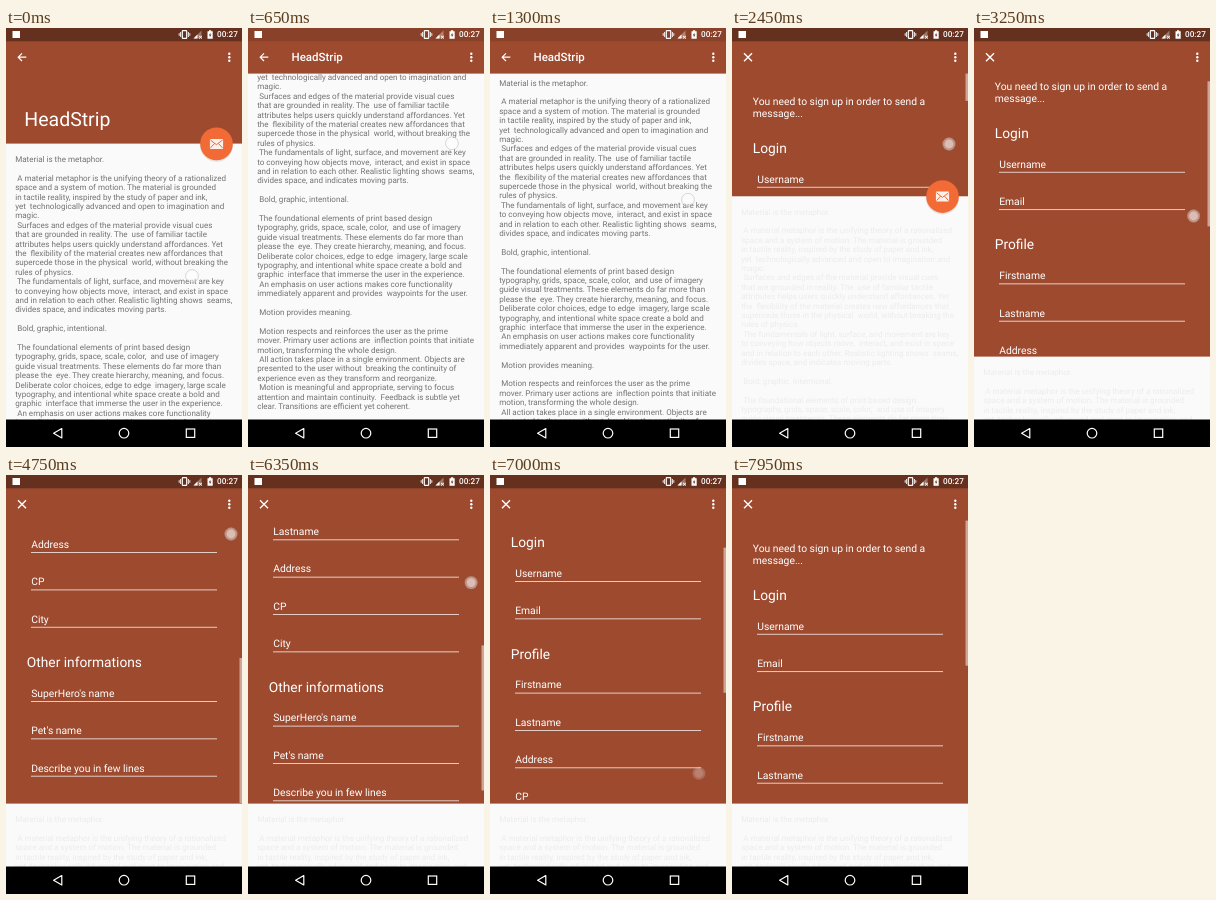
Write an HTML page that moves like this. It is 236 px wide and 419 px high and loops after 8000 ms.

```html
<!DOCTYPE html>
<html lang="en">
<head>
<meta charset="utf-8">
<title>Expanding app bar</title>
<style>
  html, body { margin: 0; width: 100%; height: 100%; overflow: hidden; background: #000; }
  svg { display: block; width: 236px; height: 419px; }
  text { font-family: Roboto, sans-serif; white-space: pre; fill: #fff; text-rendering: geometricPrecision; }
  #body text { font-size: 8.05px; fill: #737373; }
  .field, .intro { font-size: 10.33px; }
  .head { font-size: 13.78px; }
  .line { fill: none; stroke: #fff; }
</style>
</head>
<body>
<svg viewBox="0 0 236 419">
  <defs>
    <clipPath id="formClip"><rect id="formBox" x="0" y="45" width="236" height="284"/></clipPath>
  </defs>
  <rect width="236" height="419" fill="#fafafa"/>
  <g id="body"></g>

  <rect id="header" width="236" height="116" fill="#9d4a2f"/>
  <g id="form" clip-path="url(#formClip)">
    <g id="fields"></g>
    <rect id="thumb" x="233.5" width="2.5" fill="#fff" fill-opacity=".5"/>
  </g>
  <text id="title">HeadStrip</text>
  <path id="back" class="line" stroke-width="1.2" d="M20.3 29.2H12.5M16 25.4L12.2 29.2L16 33"/>
  <path id="close" class="line" stroke-width="1.4" d="M12 25.2L20 33.2M20 25.2L12 33.2"/>
  <g fill="#fff">
    <circle cx="223.3" cy="25.8" r="1.2"/>
    <circle cx="223.3" cy="29.3" r="1.2"/>
    <circle cx="223.3" cy="32.8" r="1.2"/>
  </g>

  <g id="fab">
    <circle cy="1.2" r="16.6" fill="#000" fill-opacity=".1"/>
    <circle r="16.3" fill="#f26a35"/>
    <rect x="-6.6" y="-5" width="13.2" height="10" rx="1" fill="#fdf0ea"/>
    <path d="M-6 -3.8L0 .8L6 -3.8M-6 4L-2 -.4M6 4L2 -.4" fill="none" stroke="#f26a35"/>
  </g>

  <rect id="status" width="236" height="13.3"/>
  <rect x="6.5" y="3" width="7.5" height="7" fill="#fff"/>
  <rect class="line" x="176.3" y="2.6" width="4.4" height="7.8" rx=".7" stroke-width="1.2"/>
  <path class="line" stroke-width=".9" d="M174.6 4V9M182.4 4V9M173.2 5.2V7.8M183.8 5.2V7.8"/>
  <path d="M195.5 2.5V10.5H187.5Z" fill="#fff" fill-opacity=".35"/>
  <path d="M191.5 6.5V10.5H187.5Z" fill="#fff"/>
  <path class="line" stroke-width="1" d="M193 7.8L196 10.6M196 7.8L193 10.6"/>
  <path d="M201.5 3.2H203V2.3H205.2V3.2H206.7V10.7H201.5Z" fill="#fff"/>
  <path d="M204.5 4.5L202.8 7.4H204L203.7 9.4L205.4 6.5H204.2Z" fill="#66301f"/>
  <text x="211" y="9.2" font-size="8.2" font-weight="500">00:27</text>

  <rect y="391.5" width="236" height="28" fill="#000"/>
  <path class="line" stroke-width="1.2" stroke-linejoin="round" d="M55.8 400.6V410L47.6 405.3Z"/>
  <circle class="line" cx="118" cy="405.2" r="4.8" stroke-width="1.2"/>
  <rect class="line" x="180.3" y="401" width="8.4" height="8.4" stroke-width="1.2"/>

  <g id="touch">
    <circle r="6.4" fill="#fff" fill-opacity=".4" stroke="#888" stroke-opacity=".3"/>
    <circle r="4.4" fill="#fff" fill-opacity=".4"/>
  </g>
</svg>

<script>
const LOOP = 8000, STEP = 50;
const BAR = 45.6, HEADER = 115.6, SHEET = 328.6, CONTENT = 552, PAGE_END = 129;
const $ = id => document.getElementById(id);

const copy = `Material is the metaphor.

 A material metaphor is the unifying theory of a rationalized
space and a system of motion. The material is grounded
in tactile reality, inspired by the study of paper and ink,
yet  technologically advanced and open to imagination and
magic.
 Surfaces and edges of the material provide visual cues
that are grounded in reality. The  use of familiar tactile
attributes helps users quickly understand affordances. Yet
the  flexibility of the material creates new affordances that
supercede those in the physical  world, without breaking the
rules of physics.
 The fundamentals of light, surface, and movement are key
to conveying how objects move,  interact, and exist in space
and in relation to each other. Realistic lighting shows  seams,
divides space, and indicates moving parts.

 Bold, graphic, intentional.

 The foundational elements of print based design
typography, grids, space, scale, color,  and use of imagery
guide visual treatments. These elements do far more than
please the  eye. They create hierarchy, meaning, and focus.
Deliberate color choices, edge to edge  imagery, large scale
typography, and intentional white space create a bold and
graphic  interface that immerse the user in the experience.
 An emphasis on user actions makes core functionality
immediately apparent and provides  waypoints for the user.

 Motion provides meaning.

 Motion respects and reinforces the user as the prime
mover. Primary user actions are  inflection points that initiate
motion, transforming the whole design.
 All action takes place in a single environment. Objects are
presented to the user without  breaking the continuity of
experience even as they transform and reorganize.
 Motion is meaningful and appropriate, serving to focus
attention and maintain continuity.  Feedback is subtle yet
clear. Transitions are efficient yet coherent.`;

const NS = 'http://www.w3.org/2000/svg';
function add(parent, tag, attrs, text = '') {
  const el = parent.appendChild(document.createElementNS(NS, tag));
  for (const k in attrs) el.setAttribute(k, attrs[k]);
  el.textContent = text;
}

copy.split('\n').forEach((s, i) => add($('body'), 'text', { x: 9.2, y: 2.9 + i * 9.4 }, s));

// The form flows downwards: each heading and field advances y.
const ROW = 37.35;
let y = 76.7;
const label = (cls, x, s) => add($('fields'), 'text', { class: cls, x, y }, s);
function section(name, fields) {
  label('head', 20.8, name);
  y += 29.8;
  for (const s of fields) {
    label('field', 25.2, s);
    add($('fields'), 'rect', { x: 25, y: y + 4.2, width: 186, height: .9, fill: '#fff', 'fill-opacity': .8 });
    y += ROW;
  }
  y += 7.1;
}
label('intro', 20.8, 'You need to sign up in order to send a');
y += 12.1;
label('intro', 20.8, 'message...');
y += 36;
section('Login', ['Username', 'Email']);
section('Profile', ['Firstname', 'Lastname', 'Address', 'CP', 'City']);
section('Other informations', ["SuperHero's name", "Pet's name", 'Describe you in few lines']);

// Each touch shows from down to lift and travels by dx, dy between from and to.
const touch = (down, lift, from, to, x, y, dx = 0, dy = 0) => ({ down, lift, from, to, x, y, dx, dy });
const pageSwipes = [
  touch(0, 700, 0, 670, 186, 248, 18, -133),
  touch(950, 1700, 930, 1750, 204, 115, -14, 133)
];
const tap = touch(1850, 2500, 1850, 2500, 217, 116);
const formSwipes = [
  touch(3150, 3650, 3100, 3800, 219, 203, 5, -127),
  touch(3950, 4850, 3950, 4750, 220, 200, 5, -141),
  touch(5700, 6920, 6120, 7350, 225, 83, -20, 268)
];
const touches = [...pageSwipes, tap, ...formSwipes];
const LIFT = 150;

const mix = (a, b, f) => a + (b - a) * f;
const ramp = (t, from, to) => Math.min(1, Math.max(0, (t - from) / (to - from)));
function ease(t, from, to) {
  const u = ramp(t, from, to);
  return u * u * (3 - 2 * u);
}
const travel = (swipes, t) => swipes.reduce((sum, s) => sum - s.dy * ease(t, s.from, s.to), 0);

const set = (id, attrs) => { for (const k in attrs) $(id).setAttribute(k, attrs[k]); };
const show = (id, on) => set(id, { visibility: on ? 'visible' : 'hidden' });

function draw(t) {
  const open = t >= 2350;
  const scroll = Math.min(PAGE_END, travel(pageSwipes, t));
  const base = mix(HEADER, SHEET, ease(t, 2330, 2700));
  const h = Math.max(BAR, base - scroll);
  const f = Math.min(1, scroll / (HEADER - BAR));

  set('header', { height: h });
  set('status', { 'fill-opacity': mix(.35, .12, f) });
  set('body', { transform: `translate(0 ${base + 15.4 - scroll})`, opacity: mix(1, .1, ramp(t, 2100, 2400)) });
  set('title', {
    x: mix(18.3, 43.5, f), y: mix(98, 33.2, f),
    'font-size': mix(19.5, 11.5, f), 'font-weight': f === 1 ? 500 : 400
  });
  show('title', !open);
  show('back', !open);
  show('close', open);
  show('form', open);

  const view = h - BAR, offset = travel(formSwipes, t);
  set('formBox', { height: view });
  set('fields', { transform: `translate(0 ${-offset})` });
  set('thumb', {
    y: BAR + offset * view / CONTENT, height: view * view / CONTENT,
    opacity: 1 - ramp(t, 5200, 5450) + ramp(t, 5650, 5700)
  });

  const size = 1 - ease(t, 250, 450) + ease(t, 1400, 1600) - ease(t, 2450, 2650);
  set('fab', { transform: `translate(210.5 ${h + .3}) scale(${size})` });

  const p = touches.find(k => t >= k.down && t < k.lift + LIFT);
  show('touch', p);
  if (p) {
    const e = ease(t, p.from, p.to);
    set('touch', {
      transform: `translate(${p.x + p.dx * e} ${p.y + p.dy * e})`,
      opacity: 1 - ramp(t, p.lift, p.lift + LIFT)
    });
  }
}

const start = performance.now();
function tick() {
  const t = (performance.now() - start) % LOOP;
  draw(Math.floor(t / STEP) * STEP);
  requestAnimationFrame(tick);
}
tick();
</script>
</body>
</html>
```
